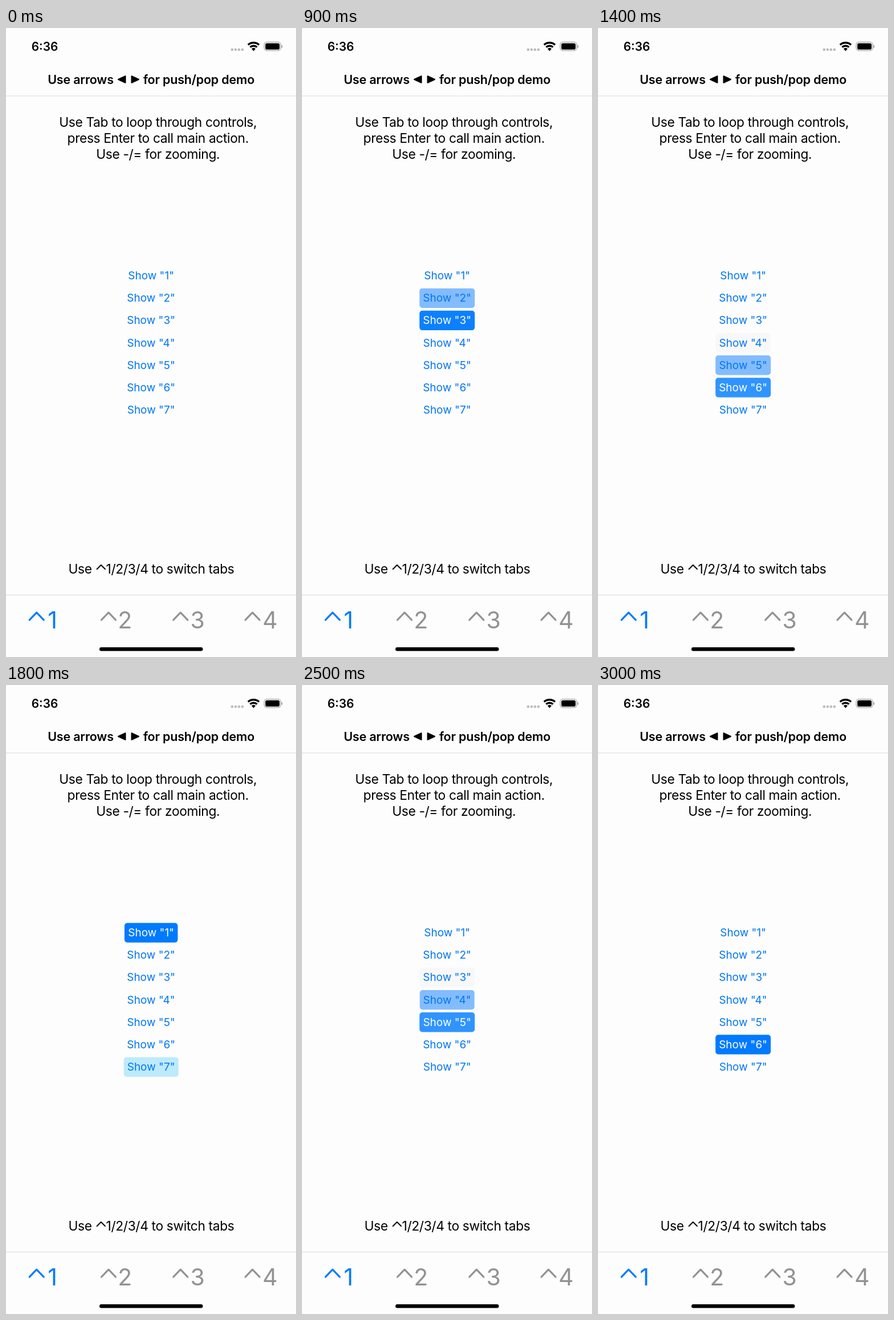
Animation, 509 px wide and 1101 px high, one loop 3.2 s. Source, as an HTML page with a canvas:

```html
<!DOCTYPE html>
<html lang="en">
<head>
<meta charset="utf-8">
<title>Keyboard focus demo</title>
<style>
html, body { margin: 0; width: 100%; height: 100%; overflow: hidden; background: #fdfdfd; }
canvas { display: block; width: 509px; height: 1101px; }
</style>
</head>
<body>
<canvas id="stage"></canvas>
<script>
const W = 509, H = 1101, LOOP = 3200, STEP = 100;
const BLUE = '#007aff', LINK = '#0076f4', GREY = '#929292';
const canvas = document.getElementById('stage');
const ctx = canvas.getContext('2d');
const dpr = window.devicePixelRatio || 1;
canvas.width = W * dpr;
canvas.height = H * dpr;

// Moments at which Tab moves the focus to the next button
const presses = [480, 660, 850, 1030, 1190, 1390, 1530, 1670, 1870, 2070, 2290, 2490, 2680];
const BUTTONS = 7;

function text(str, x, y, size, color = '#000', spacing = 0, weight = 400) {
  ctx.font = `${weight} ${size}px Inter, sans-serif`;
  ctx.letterSpacing = spacing + 'px';
  ctx.textAlign = 'center';
  ctx.fillStyle = color;
  ctx.fillText(str, x, y);
}

function box(x, y, w, h, r, color) {
  ctx.fillStyle = color;
  ctx.beginPath();
  ctx.roundRect(x, y, w, h, r);
  ctx.fill();
}

function caret(x, y, w, h, line, color) {
  ctx.strokeStyle = color;
  ctx.lineWidth = line;
  ctx.lineCap = ctx.lineJoin = 'round';
  ctx.beginPath();
  ctx.moveTo(x, y + h);
  ctx.lineTo(x + w / 2, y);
  ctx.lineTo(x + w, y + h);
  ctx.stroke();
}

function triangle(tip, base, y) {
  ctx.fillStyle = ctx.strokeStyle = '#000';
  ctx.lineWidth = 2;
  ctx.lineJoin = 'round';
  ctx.beginPath();
  ctx.moveTo(tip, y);
  ctx.lineTo(base, y - 5.8);
  ctx.lineTo(base, y + 5.8);
  ctx.closePath();
  ctx.fill();
  ctx.stroke();
}

function wifi(x, y) {
  const from = -Math.PI / 2 - 0.72, to = -Math.PI / 2 + 0.72;
  ctx.strokeStyle = ctx.fillStyle = '#000';
  ctx.lineCap = 'butt';
  ctx.lineWidth = 3.4;
  for (const r of [14.6, 9.2]) {
    ctx.beginPath();
    ctx.arc(x, y, r, from, to);
    ctx.stroke();
  }
  ctx.beginPath();
  ctx.moveTo(x, y);
  ctx.arc(x, y, 5.4, from, to);
  ctx.fill();
}

function statusBar() {
  text('6:36', 68, 40, 20.8, '#000', 0, 600);
  for (let i = 0; i < 4; i++) box(394.8 + i * 6, 35.8, 4.2, 4.2, 1.2, '#bcbcbc');
  wifi(434.5, 40.4);
  ctx.strokeStyle = '#a6a6a6';
  ctx.lineWidth = 1.3;
  ctx.beginPath();
  ctx.roundRect(453.2, 24.7, 29, 15, 4.6);
  ctx.stroke();
  box(455.2, 26.7, 25, 11, 2.8, '#000');
  box(483.4, 29.8, 1.8, 5, 0.9, '#a6a6a6');
}

function labels() {
  text('Use arrows', 131, 98, 21.5, '#000', -0.2, 600);
  triangle(197, 209.5, 90);
  triangle(233, 220.5, 90);
  text('for push/pop demo', 338.5, 98, 21.5, '#000', -0.2, 600);

  ['Use Tab to loop through controls,', 'press Enter to call main action.', 'Use -/= for zooming.']
    .forEach((line, i) => text(line, 266.7, 173 + i * 28, 22.8, '#000', -0.37));

  text('Use', 130, 955, 22.8, '#000', -0.37);
  caret(159.5, 940, 14.6, 7.2, 1.9, '#000');
  text('1/2/3/4 to switch tabs', 288, 955, 22.8, '#000', -0.37);
}

function tabBar() {
  box(0, 118.5, W, 1, 0, '#d9d9d9');
  box(0, 992, W, 1, 0, '#d9d9d9');
  for (let i = 0; i < 4; i++) {
    const color = i ? GREY : BLUE;
    caret(41.2 + i * 126.3, 1023.2, 25, 13, 3.2, color);
    text(String(i + 1), 81.5 + i * 127.3, 1051, 41, color);
  }
  box(164, 1084, 181.5, 6.5, 3.25, '#000');
}

const focusFill = age => age < 25 ? '#3094ff' : age < 100 ? '#0c80ff' : BLUE;

function blurFill(age) {
  if (age < 100) return '#83bcfe';
  if (age < 180) return '#bdeafd';
  return age < 230 ? '#f8f8f8' : null;
}

// Background and text colour of one button at time t
function buttonLook(index, t) {
  const current = presses.filter(p => p <= t).length - 1;
  if (current >= 0 && current % BUTTONS === index) {
    return [focusFill(t - presses[current]), '#fff'];
  }
  for (let k = current; k > 0; k--) {
    if ((k - 1) % BUTTONS === index) return [blurFill(t - presses[k]), LINK];
  }
  return [null, LINK];
}

function buttons(t) {
  for (let i = 0; i < BUTTONS; i++) {
    const [fill, color] = buttonLook(i, t);
    const top = 416.5 + i * 39.15;
    const label = `Show "${i + 1}"`;
    const width = i === 0 ? 93.5 : i === 3 || i === 6 ? 96 : 97;
    if (fill) box(254.7 - width / 2, top, width, 34.3, 5, fill);
    text(label, 254.6, top + 23.6, 19, color);
  }
}

function draw(now) {
  const t = Math.floor(now % LOOP / STEP) * STEP;
  ctx.setTransform(dpr, 0, 0, dpr, 0, 0);
  box(0, 0, W, H, 0, '#fdfdfd');
  statusBar();
  labels();
  buttons(t);
  tabBar();
}

const start = performance.now();
function tick() {
  draw(performance.now() - start);
  requestAnimationFrame(tick);
}
tick();
</script>
</body>
</html>
```
